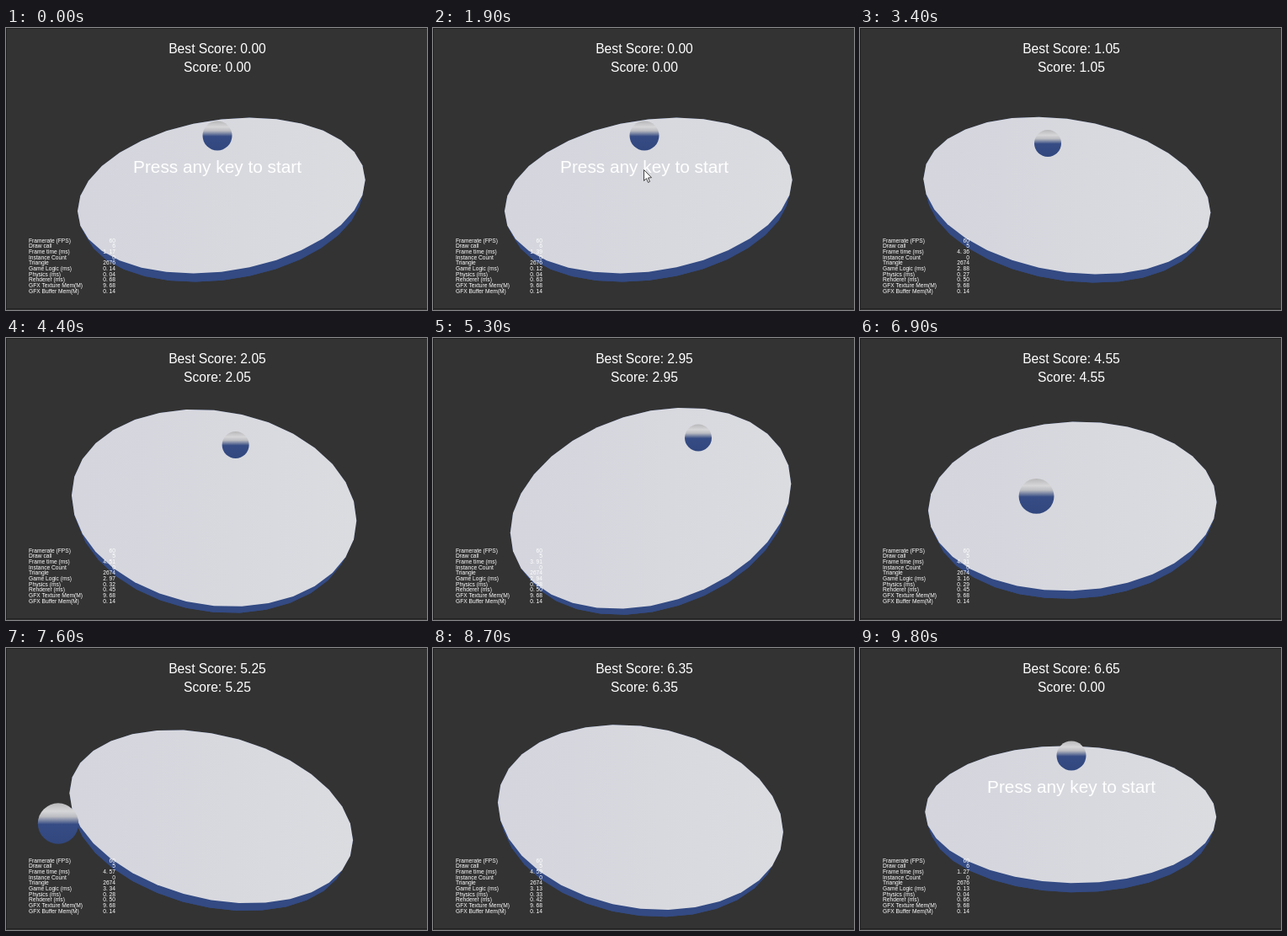
Recreate the animation shown at these times as an HTML page with a canvas. Size 500 by 335 pixels, loop 10 s.

```html
<!DOCTYPE html>
<html lang="en">
<head>
<meta charset="utf-8">
<title>Balance</title>
<style>
html, body { margin: 0; width: 100%; height: 100%; overflow: hidden; background: #333; }
canvas { display: block; width: 500px; height: 335px; }
</style>
</head>
<body>
<canvas id="stage"></canvas>
<script>
const LOOP = 10000, STEP = 100, START = 2350, DROP = 7600, RESET = 9050;
const SIDES = 32;
const FONT = '"Liberation Sans", Arial, sans-serif';

// [time, skew, half height]: where each tilt of the plate comes to rest
const TILTS = [
  [2300, -18.5, 92.5], [3400, 20, 93.5], [4500, 14, 118],
  [5300, -29, 119.5], [6300, -31, 99.5], [7600, 28, 103], [9000, 14, 112]
];
const LEVEL = [3, 81.5];
// [time, x, y, radius]: turning points of the ball
const ROLLS = [
  [START, 251, 128, 17.5], [3400, 223, 137, 16], [5300, 315, 118.5, 16],
  [6300, 292, 168, 18.5], [DROP, 62, 208.5, 24.2]
];
const LABELS = ['Framerate (FPS)', 'Draw call', 'Frame time (ms)', 'Instance Count', 'Triangle',
  'Game Logic (ms)', 'Physics (ms)', 'Renderer (ms)', 'GFX Texture Mem(M)', 'GFX Buffer Mem(M)'];

const canvas = document.getElementById('stage');
const ctx = canvas.getContext('2d');
const ratio = window.devicePixelRatio || 1;
canvas.width = 500 * ratio;
canvas.height = 335 * ratio;
ctx.scale(ratio, ratio);

// Smooth interpolation that never overshoots its keys
function sample(keys, t) {
  const last = keys.length - 1;
  if (t <= keys[0][0]) return keys[0].slice(1);
  if (t >= keys[last][0]) return keys[last].slice(1);
  const i = keys.findIndex(k => k[0] > t) - 1;
  const span = keys[i + 1][0] - keys[i][0];
  const u = (t - keys[i][0]) / span, v = 1 - u;
  return keys[i].slice(1).map((from, n) => {
    const c = n + 1, to = keys[i + 1][c];
    const slope = j => (keys[j + 1][c] - keys[j][c]) / (keys[j + 1][0] - keys[j][0]);
    const tangent = j => {
      if (j === 0) return 0;
      if (j === last) return slope(last - 1);
      const a = slope(j - 1), b = slope(j);
      return a * b <= 0 ? 0 : 2 * a * b / (a + b);
    };
    return from * v * v * (1 + 2 * u) + to * u * u * (3 - 2 * u)
      + span * u * v * (tangent(i) * v - tangent(i + 1) * u);
  });
}

function random(seed) {
  const n = Math.sin(seed * 12.9898) * 43758.5453;
  return n - Math.floor(n);
}

function ballAt(t) {
  const [x, y, r] = sample(ROLLS, t);
  const fall = Math.max(0, t - DROP);
  return [x - 12 * (1 - Math.exp(-fall / 150)), y + 0.05 * fall + 0.0004 * fall * fall, r + fall * 0.004];
}

function polygon(points, fill) {
  ctx.beginPath();
  points.forEach(([x, y]) => ctx.lineTo(x, y));
  ctx.closePath();
  ctx.fillStyle = fill;
  ctx.fill();
}

function drawPlate(skew, height) {
  const lean = height - LEVEL[1];
  const width = 173 - lean * 0.085 - skew * skew * 0.0036;
  const cx = 251 - skew * 0.26, cy = 197.7 + lean * 0.12;
  const depth = Math.sqrt(height * height - skew * skew);
  const drop = 15.3 * Math.sqrt(1 - (height / width) ** 2);
  const ring = (scale, dx, dy) => Array.from({ length: SIDES }, (_, i) => {
    const a = i / SIDES * 2 * Math.PI;
    return [cx + dx + scale * width * Math.cos(a),
      cy + dy + scale * (skew * Math.cos(a) + depth * Math.sin(a))];
  });
  const top = ring(1, 0, 0), bottom = ring(0.97, -skew / width * drop, drop);
  top.forEach((p, i) => {
    const j = (i + 1) % SIDES;
    polygon([p, top[j], bottom[j], bottom[i]], '#334a83');
  });
  polygon(bottom, '#334a83');
  const shade = ctx.createLinearGradient(cx - width, 0, cx + width, 0);
  shade.addColorStop(0, '#d4d5dd');
  shade.addColorStop(1, '#dbdce0');
  polygon(top, shade);
}

function drawBall(x, y, r) {
  const shade = ctx.createLinearGradient(0, y - r, 0, y + r);
  shade.addColorStop(0, '#b8b8ba');
  shade.addColorStop(0.2, '#d6d6d8');
  shade.addColorStop(0.33, '#bcbdc2');
  shade.addColorStop(0.52, '#364c84');
  shade.addColorStop(1, '#31477e');
  ctx.beginPath();
  ctx.arc(x, y, r, 0, 2 * Math.PI);
  ctx.fillStyle = shade;
  ctx.fill();
}

function text(string, x, y, size, align) {
  ctx.font = size + 'px ' + FONT;
  ctx.textAlign = align;
  ctx.fillStyle = '#fff';
  ctx.fillText(string, x, y);
}

function drawStats(t, playing) {
  const slot = Math.floor(t / 500);
  const ms = (idle, busy) => {
    const jitter = 0.9 + 0.2 * random(slot + idle);
    return ((playing ? busy : idle) * jitter).toFixed(2).replace('.', '. ');
  };
  const values = [60, playing ? 5 : 6, ms(1.3, 4.2), 0, playing ? 2674 : 2676,
    ms(0.13, 3.2), ms(0.04, 0.3), ms(0.64, 0.46), '9. 68', '0. 14'];
  LABELS.forEach((label, i) => {
    const y = 254.8 + i * 6.65;
    text(label, 27, y, 6.67, 'left');
    text(values[i], 130, y, 6.67, 'right');
  });
}

function drawCursor(x, y) {
  const shape = [[0, 0], [0, 13], [3, 10.2], [5, 15], [7, 14], [5, 9.5], [9, 9.2]];
  polygon(shape.map(([dx, dy]) => [x + dx, y + dy]), '#fff');
  ctx.strokeStyle = '#333';
  ctx.lineWidth = 0.9;
  ctx.stroke();
}

function draw(t) {
  const over = t >= RESET;
  const playing = t >= START && !over;
  ctx.fillStyle = '#333';
  ctx.fillRect(0, 0, 500, 335);
  ctx.fillStyle = '#202020';
  ctx.fillRect(0, 0, 500, 1);
  ctx.fillRect(0, 0, 1, 335);
  ctx.fillRect(0, 333, 500, 1);

  drawPlate(...(over ? LEVEL : sample(TILTS, t)));
  drawBall(...ballAt(over ? 0 : t));

  const best = Math.max(0, Math.min(t, 9000) - START) / 1000;
  text('Best Score: ' + best.toFixed(2), 251, 30, 15.65, 'center');
  text('Score: ' + (playing ? best : 0).toFixed(2), 251, 52, 15.65, 'center');
  if (!playing) text('Press any key to start', 251, 172, 20.8, 'center');
  drawStats(t, playing);
  if (t >= 600 && t < START) drawCursor(250.5, 168.5);
}

const began = performance.now();
function tick() {
  const t = (performance.now() - began) % LOOP;
  draw(Math.floor(t / STEP) * STEP);
  requestAnimationFrame(tick);
}
tick();
</script>
</body>
</html>
```
